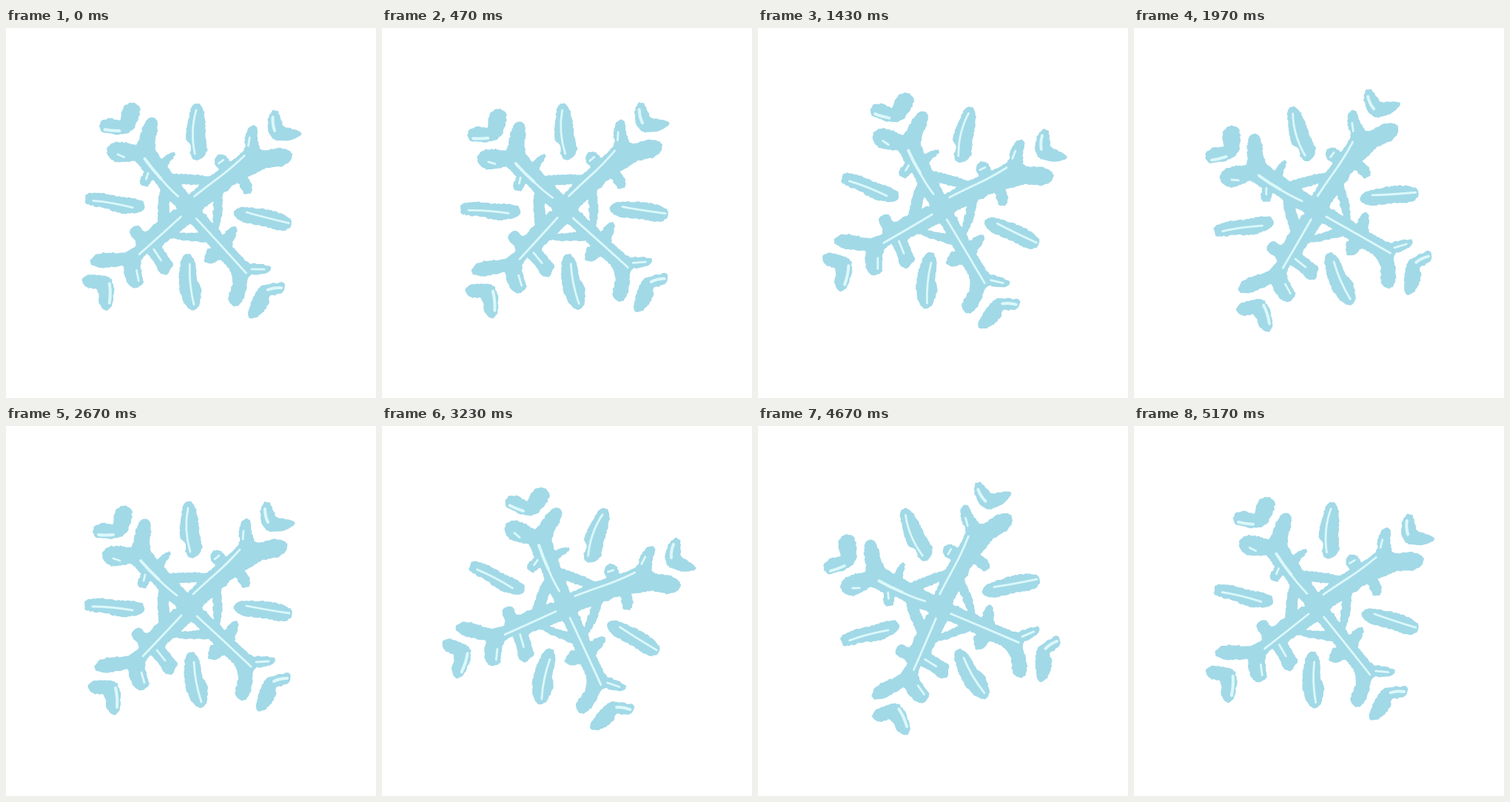
An HTML page that plays this animation: 500x500 px, repeating every 5.21 s.

```html
<!DOCTYPE html>
<html lang="en">
<head>
<meta charset="utf-8">
<title>Swinging snowflake</title>
<style>
  html, body { margin: 0; width: 100%; height: 100%; overflow: hidden; background: #fff; }
  svg { display: block; width: 100vw; height: 100vh; }
  polygon { fill: #a2d9e7; stroke: #a2d9e7; stroke-width: 1.8; stroke-linejoin: round; }
  path { fill: none; stroke: #dcf8fa; stroke-width: 2.8; stroke-linecap: round; stroke-linejoin: round; }
  .wide path { stroke-width: 4; }
</style>
</head>
<body>
<svg viewBox="0 0 500 500">
  <g id="flake">
    <!-- ring -->
    <polygon points="207,203 222,200 250,199 278,200 290,205 286,212 268,210 245,211 225,212 211,214"/>
    <polygon points="279,206 287,203 290,222 291,248 288,270 285,284 278,280 281,258 280,230"/>
    <polygon points="209,276 225,277 248,278 272,275 287,276 285,285 268,287 246,287 225,285 210,285"/>
    <polygon points="209,207 217,207 218,228 220,250 218,270 217,283 208,283 207,262 206,235"/>

    <!-- arms: upper right, upper left, lower right, lower left -->
    <polygon points="236,240 250,222 266,205 283,189 277,180 279,171 286,168 292,172 298,177 309,167 316,158 316,141 321,128 328,127 331,142 334,153 340,159 352,156 366,154 378,158 377,169 368,176 354,179 343,182 333,189 322,195 328,205 329,214 322,218 316,212 309,203 294,217 272,236 256,254 242,256"/>
    <polygon points="131,172 140,164 155,163 167,165 173,159 175,148 179,134 186,127 194,130 195,145 193,158 196,171 205,181 212,175 221,171 219,178 213,188 218,197 234,215 253,236 250,250 238,249 216,230 198,211 194,209 188,218 180,217 179,210 183,200 176,192 169,185 158,187 143,188 133,181"/>
    <polygon points="244,236 258,241 274,256 291,273 297,276 302,269 312,264 312,275 309,290 324,305 335,312 350,312 362,315 360,321 348,325 337,326 333,336 331,350 327,365 319,370 311,365 312,352 315,338 311,325 298,311 293,309 285,314 274,314 275,304 277,297 281,294 266,278 246,259 237,249"/>
    <polygon points="248,236 231,246 210,262 194,279 188,280 181,274 173,277 171,283 177,291 180,302 172,306 162,312 145,313 130,316 120,325 125,331 140,332 156,329 165,328 168,340 174,352 183,357 192,350 190,338 187,324 190,314 196,308 203,316 210,326 217,334 225,334 230,321 224,312 216,303 214,297 229,283 251,261 257,244"/>

    <!-- bars -->
    <polygon points="246,103 240,108 238,122 236,140 237,151 243,159 244,171 250,178 258,174 264,164 262,153 260,139 258,122 253,107"/>
    <polygon points="107,238 115,234 130,234 145,236 165,237 180,239 186,245 183,252 170,256 155,257 135,252 118,250 108,247"/>
    <polygon points="309,244 317,238 330,237 350,238 368,241 384,248 385,257 376,263 362,262 350,259 330,257 314,253"/>
    <polygon points="244,312 252,306 259,315 263,328 265,340 271,350 271,368 267,378 260,379 251,371 246,360 242,345 242,328"/>

    <!-- tips -->
    <polygon points="118,143 122,135 132,132 145,133 147,120 153,111 162,109 169,115 168,128 163,142 152,150 138,151 124,150"/>
    <polygon points="345,113 350,104 356,105 361,115 365,124 375,126 389,130 383,137 370,141 355,141 347,132"/>
    <polygon points="111,352 118,346 135,345 146,346 152,355 154,372 151,386 145,389 138,384 136,372 132,362 118,361"/>
    <polygon points="339,378 342,362 347,350 355,341 368,337 383,335 383,344 374,350 364,353 363,365 355,378 346,384 340,384"/>

    <!-- highlights -->
    <g class="wide">
      <path d="M182 182Q193 195 206 207"/>
      <path d="M125 147Q134 148 145 147"/>
      <path d="M350 112Q350 122 354 130"/>
      <path d="M148 354Q151 366 150 380"/>
      <path d="M362 345Q370 341 380 341"/>
    </g>
    <path d="M200 201Q215 217 231 229"/>
    <path d="M258 257Q294 290 331 325"/>
    <path d="M253 227Q269 212 284 199T316 167"/>
    <path d="M237 256Q210 285 185 311"/>
    <path d="M246 111Q240 140 249 170"/>
    <path d="M117 244Q142 244 171 249"/>
    <path d="M325 243Q349 248 383 253"/>
    <path d="M254 319Q255 346 264 373"/>
    <path d="M338 319L355 318"/>
    <path d="M145 179L154 182"/>
    <path d="M321 142L320 153"/>
    <path d="M282 180L288 175"/>
    <path d="M188 201L186 209"/>
    <path d="M183 333L187 347"/>
    <path d="M204 303L215 317"/>
  </g>
</svg>
<script>
  const flake = document.getElementById('flake');
  const LOOP = 5210, FRAMES = 156, SWING = 26;

  let seed = 11;
  const jitter = size => {
    seed = (seed * 16807) % 2147483647;
    return (seed / 2147483647 - 0.5) * size;
  };

  // Catmull-Rom value between b and c
  const spline = (a, b, c, d, u) =>
    b + u / 2 * (c - a + u * (2 * a - 5 * b + 4 * c - d + u * (3 * (b - c) + d - a)));

  // Smooth a polygon and give it a crayon-like edge
  function roughen(shape) {
    const pts = shape.getAttribute('points').split(' ').map(p => p.split(',').map(Number));
    const at = i => pts[(i + pts.length) % pts.length];
    const out = [];
    pts.forEach((p, i) => {
      const q = at(i + 1);
      const steps = Math.max(2, Math.round(Math.hypot(q[0] - p[0], q[1] - p[1]) / 2.6));
      for (let s = 0; s < steps; s++) {
        const xy = [0, 1].map(n =>
          (spline(at(i - 1)[n], p[n], q[n], at(i + 2)[n], s / steps) + jitter(1.8)).toFixed(1));
        out.push(xy.join());
      }
    });
    shape.setAttribute('points', out.join(' '));
  }
  document.querySelectorAll('polygon').forEach(roughen);

  // One swing: [step, degrees]; slow to the left, quick back to the right
  const keys = [[0, 4.6], [2, 0], [7, -13.3], [9, -18.7], [10, -20], [12, -13.5], [14, -1],
    [16, 12], [18, 20.5], [19, 22.2], [20, 20.2], [25, 8.4], [26, 4.6]];

  function angle(step) {
    const i = keys.findIndex(k => k[0] > step);
    const [a, from] = keys[i - 1], [b, to] = keys[i];
    return from + (to - from) * (step - a) / (b - a);
  }

  // The picture advances 30 times a second, on a 10 ms grid
  function draw(now) {
    const tick = Math.floor((now % LOOP) / 10);
    const frame = Math.min(FRAMES - 1, Math.floor((tick + 0.5) * 0.3));
    flake.setAttribute('transform', `rotate(${angle(frame % SWING)} 250 248)`);
  }

  let start;
  function run(now) {
    start ??= now;
    draw(now - start);
    requestAnimationFrame(run);
  }
  draw(0);
  requestAnimationFrame(run);
</script>
</body>
</html>
```
